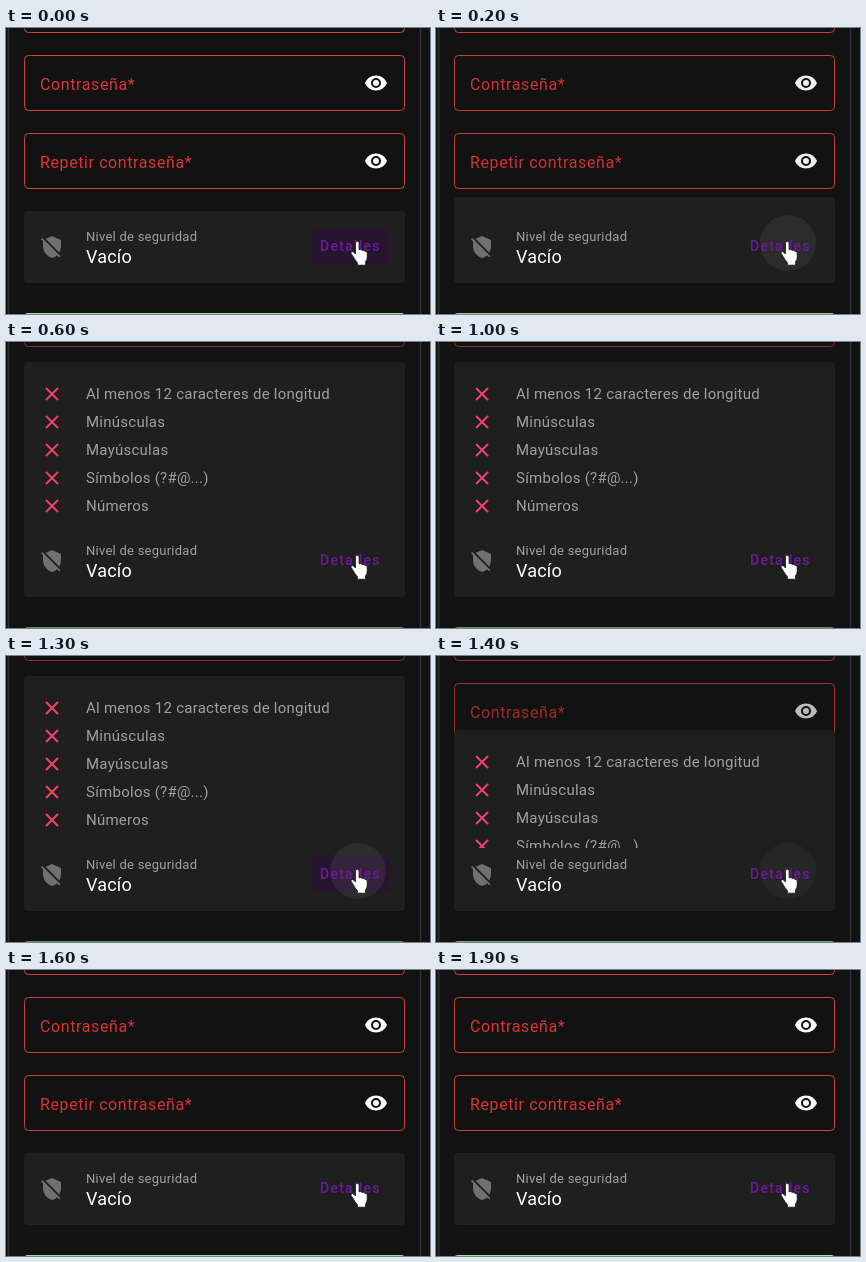
These frames come from a looping animation (424x286 px, 2 s). An HTML page:

```html
<!DOCTYPE html>
<html lang="es">
<head>
<meta charset="utf-8">
<title>Nivel de seguridad</title>
<style>
  html, body { margin: 0; width: 100%; height: 100%; overflow: hidden; background: #121212; }
  svg { display: block; width: 424px; height: 286px; font-family: Roboto, Arial, sans-serif; }
  .edge { stroke: #303030; stroke-width: 1.5; }
  .box { fill: none; stroke: #d1433e; }
  .label { fill: #dc3535; font-size: 16px; letter-spacing: .6px; }
  .rule { fill: #a0a0a0; font-size: 15px; letter-spacing: .25px; }
  .cross { fill: none; stroke: #ef4169; stroke-width: 2; }
  .caption { fill: #a0a0a0; font-size: 13px; letter-spacing: .25px; }
  .level { fill: #fff; font-size: 18px; letter-spacing: .2px; }
  .action { fill: #6a1b9a; font-size: 14px; font-weight: 500; letter-spacing: 1.25px; }
</style>
</head>
<body>
<svg viewBox="0 0 424 286">
  <defs>
    <clipPath id="listArea"><rect x="18" y="0" width="381" height="192"/></clipPath>
    <path id="eye" fill="#fff" d="M12 9a3 3 0 0 0 0 6a3 3 0 0 0 0-6M12 17a5 5 0 0 1 0-10a5 5 0 0 1 0 10M12 4.5C7 4.5 2.73 7.61 1 12C2.73 16.39 7 19.5 12 19.5S21.27 16.39 23 12C21.27 7.61 17 4.5 12 4.5Z"/>
  </defs>
  <rect width="424" height="286" fill="#121212"/>
  <path class="edge" d="M2.5 0V286M414.5 0V286"/>

  <g id="form">
    <rect class="box" x="18.5" y="-50.5" width="380" height="55" rx="4"/>
    <rect class="box" x="18.5" y="27.5" width="380" height="55" rx="4"/>
    <text class="label" x="34" y="62">Contraseña*</text>
    <use href="#eye" x="358" y="43"/>
    <rect class="box" x="18.5" y="105.5" width="380" height="55" rx="4"/>
    <text class="label" x="34" y="140">Repetir contraseña*</text>
    <use href="#eye" x="358" y="121"/>
    <rect x="18" y="285" width="381" height="40" rx="4" fill="#9be29b"/>
  </g>

  <rect id="panel" x="18" width="381" rx="4" fill="#1f1f1f"/>
  <g clip-path="url(#listArea)"><g id="list"></g></g>

  <path transform="translate(34 207)" fill="#707070" d="M1 4.27L2.28 3L20.5 21.22L19.23 22.5L17 20.27C15.57 21.6 13.87 22.55 12 23C6.84 21.74 3 16.55 3 11V6.27ZM12 1L21 5V11C21 13.28 20.35 15.5 19.23 17.41L5.65 3.82Z"/>
  <text class="caption" x="80" y="213">Nivel de seguridad</text>
  <text class="level" x="80" y="235">Vacío</text>

  <rect id="hover" x="306" y="201" width="77" height="35" rx="4" fill="#29142f"/>
  <circle id="ripple" cx="352" cy="215" fill="#fff"/>
  <text class="action" x="314" y="223">Detalles</text>
  <path fill="#fff" stroke="#111" stroke-width=".8" stroke-linejoin="round" d="M349.5 215.2q0-2 1.8-2t1.8 2v6.6q2.3-.9 3 .6q2-.7 2.6.9q2.5-.5 2.5 1.8v4.4q0 2-1.6 4.2v3.5h-8.2v-2.6q-2.6-2.6-4-5.6l-2.3-3.6q-.6-1.7 1-2q1.6 0 3.4 2.6z"/>
</svg>
<script>
const LOOP = 2000, STEP = 100, SLIDE = 300;
const OPEN_AT = 150, CLOSE_AT = 1314;
const CLOSED_TOP = 183, OPEN_TOP = 20, BOTTOM = 255;
const RULES = ['Al menos 12 caracteres de longitud', 'Minúsculas', 'Mayúsculas', 'Símbolos (?#@...)', 'Números'];

const el = id => document.getElementById(id);
const clamp = v => Math.min(1, Math.max(0, v));
const set = (id, attrs) => Object.entries(attrs).forEach(([k, v]) => el(id).setAttribute(k, v));

el('list').innerHTML = RULES.map((rule, i) => {
  const y = 32 + i * 28;
  return `<path class="cross" d="M40 ${y - 6}l12 12m0-12l-12 12"/><text class="rule" x="80" y="${y + 5}">${rule}</text>`;
}).join('');

// cubic-bezier(.4, 0, .2, 1)
function ease(x) {
  let lo = 0, hi = 1;
  for (let i = 0; i < 24; i++) {
    const s = (lo + hi) / 2, r = 1 - s;
    if (1.2 * r * r * s + .6 * r * s * s + s ** 3 < x) lo = s; else hi = s;
  }
  return lo * lo * (3 - 2 * lo);
}

function render(t) {
  const opening = clamp((t - OPEN_AT) / SLIDE);
  const closing = clamp((t - CLOSE_AT) / SLIDE);
  const top = CLOSED_TOP + (OPEN_TOP - CLOSED_TOP) * (ease(opening) - ease(closing));
  set('panel', { y: top, height: BOTTOM - top });
  set('list', { transform: `translate(0 ${top})` });
  set('form', { opacity: 1 - .4 * (opening - closing) });

  const sincePress = t >= 1200 ? t - 1200 : t - 100;
  const shown = sincePress >= 0 && sincePress < 300;
  set('ripple', {
    r: 12 + 16 * clamp(sincePress / 100),
    opacity: shown ? .06 * (1 - clamp((sincePress - 100) / 200)) : 0
  });
  set('hover', { opacity: t < 200 || (t >= 1200 && t < 1400) ? 1 : 0 });
}

const start = performance.now();
function tick() {
  const t = (performance.now() - start) % LOOP;
  render(Math.floor(t / STEP) * STEP);
  requestAnimationFrame(tick);
}
tick();
</script>
</body>
</html>
```
